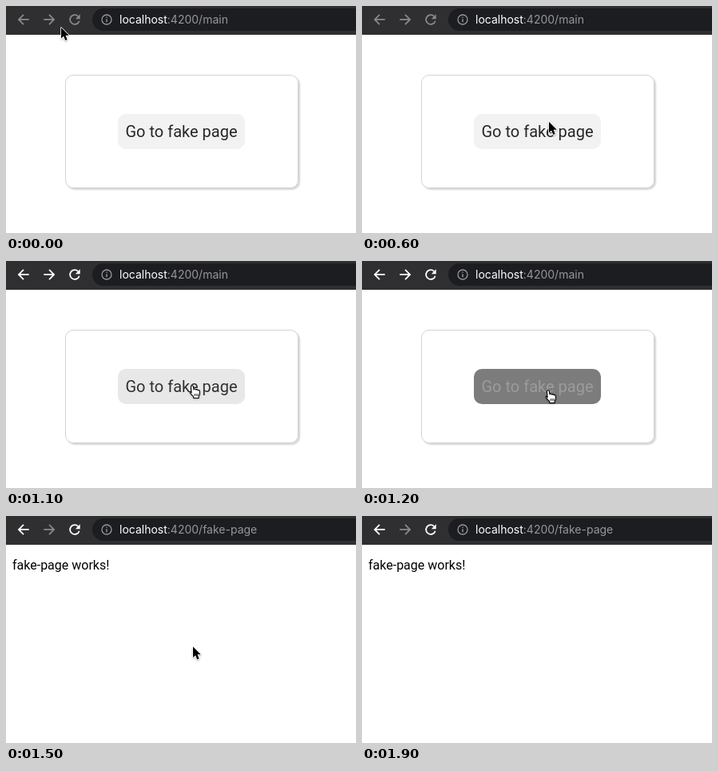
An HTML page for the animation above (2700 ms loop, 438 by 284 pixels).

```html
<!DOCTYPE html>
<html lang="en">
<head>
<meta charset="utf-8">
<title>Navigation demo</title>
<style>
  html, body { margin: 0; width: 100%; height: 100%; overflow: hidden; background: #fff; }
  #stage { position: relative; width: 438px; height: 284px; overflow: hidden; background: #fff; font-family: Roboto, sans-serif; }
  #bar { position: absolute; left: 0; top: 0; width: 438px; height: 36px; background: #2f2f31; }
  #bar svg { position: absolute; left: 0; top: 0; }
  #pill { position: absolute; left: 108px; top: 3px; width: 350px; height: 28px; border-radius: 14px; background: #1c1d21; }
  #url { position: absolute; left: 142px; top: 7px; font: 14px/20px Inter, sans-serif; color: #96979b; white-space: pre; }
  #url b { font-weight: 400; color: #fff; }
  #card { position: absolute; left: 74px; top: 86px; width: 292px; height: 142px; box-sizing: border-box;
    border: 1px solid #d3d3d3; border-radius: 10px; box-shadow: 2px 2px 2px rgba(0, 0, 0, .17); }
  #button { position: absolute; left: 140px; top: 135px; width: 159px; height: 44px; box-sizing: border-box;
    padding: 10px 0 0 9.5px; border-radius: 10px; font-size: 20px; line-height: 24px; white-space: nowrap; }
  #fake { position: absolute; left: 8px; top: 52px; margin: 0; font-size: 16px; line-height: 19px; color: #000; }
  #pointers { position: absolute; left: 0; top: 0; }
</style>
</head>
<body>
<div id="stage">
  <div id="bar">
    <div id="pill"></div>
    <svg width="438" height="36" fill="none">
      <g id="back" transform="translate(11.9 6.9) scale(.84)" stroke-width="2.1">
        <path d="M20 12H5.5M12 4.8 4.8 12l7.2 7.2"/>
      </g>
      <g id="forward" transform="translate(64.1 6.9) scale(-.84 .84)" stroke-width="2.1">
        <path d="M20 12H5.5M12 4.8 4.8 12l7.2 7.2"/>
      </g>
      <g id="reload" transform="translate(75.9 6.9) scale(.84)" stroke-width="2.1">
        <path d="M16.95 7.05A7 7 0 1 0 18.75 14"/>
        <path d="M20 4v7h-7z" fill="currentColor" stroke="none"/>
      </g>
      <g stroke="#96979b" stroke-width="1.3">
        <circle cx="126" cy="17" r="6"/>
        <path d="M126 16.2v4M126 13.4v1.4" stroke-width="1.4"/>
      </g>
    </svg>
    <div id="url"><b>localhost</b>:4200/<span id="path">main</span></div>
  </div>
  <div id="main">
    <div id="card"></div>
    <div id="button">Go to fake page</div>
  </div>
  <p id="fake">fake-page works!</p>
  <svg id="pointers" width="438" height="284" stroke-linejoin="round">
    <g id="arrow" style="filter: drop-shadow(0 1px 1px rgba(0,0,0,.3))">
      <path d="M0 0V13.6L3.1 10.7 5.3 15.9 7.7 14.9 5.5 9.8H9.8Z" fill="#000" stroke="#fff" stroke-width="1.6" paint-order="stroke"/>
    </g>
    <g id="hand" style="filter: drop-shadow(0 1px 1px rgba(0,0,0,.25))">
      <path d="M3.2 9.6V2Q3.2.6 4.5.6T5.8 2V6Q8-.2 0 0" fill="none"/>
      <path d="M3.1 9.9 2.5 2.2Q2.5.7 3.8.7T5.3 2L6 6Q6.3 5 7.3 5T8.7 6.3Q9 5.5 10 5.6T11.2 7Q11.6 6.4 12.4 6.6T13.4 8V11Q13.3 13 12.1 14.2V16.5H5.8V14.9L2.2 11.2Q.5 9.3 1.2 8.6T3.1 9.9Z" fill="#fff" stroke="#000" stroke-width="1.1"/>
      <path d="M7 11v3M9 11v3M11 11v3" stroke="#000" stroke-width=".8"/>
    </g>
  </svg>
</div>
<script>
const LOOP = 2700, FOCUS = 900, OPENED = 1500;
const $ = id => document.getElementById(id);

// start time, pointer shape, x, y
const moves = [
  [0, "arrow", 69, 27],
  [100, "arrow", 101, 17.5],
  [200, "arrow", 203, 41],
  [300, "arrow", 246, 75],
  [400, "arrow", 245, 108],
  [500, "arrow", 238, 134],
  [600, "arrow", 234, 145],
  [700, "arrow", 234, 151],
  [1100, "hand", 229, 155],
  [1200, "hand", 229, 161],
  [1300, "hand", 229, 164],
  [1500, "arrow", 234, 163.5],
  [1800, "arrow", 112.5, 147],
  [1900, "", 0, 0]
];

// start time, button fill, label colour
const shades = [
  [0, "#f2f2f2", "#262626"],
  [1100, "#e8e8e8", "#303030"],
  [1200, "#7c7c7c", "#9c9c9c"],
  [1300, "#353535", "#e6e6e6"]
];

const at = (steps, t) => steps.findLast(s => s[0] <= t);
const show = (id, on) => $(id).style.display = on ? "" : "none";

function tint(id, on) {
  $(id).style.color = $(id).style.stroke = on ? "#fff" : "#88898b";
}

function draw(t) {
  const opened = t >= OPENED, focused = t >= FOCUS;
  tint("back", focused);
  tint("forward", focused && !opened);
  tint("reload", focused);
  $("path").textContent = opened ? "fake-page" : "main";
  show("main", !opened);
  show("fake", opened);

  const [, fill, label] = at(shades, t);
  $("button").style.background = fill;
  $("button").style.color = label;

  const [, shape, x, y] = at(moves, t);
  for (const id of ["arrow", "hand"]) {
    show(id, id === shape);
    $(id).setAttribute("transform", `translate(${x} ${y})`);
  }
}

const start = performance.now();
function tick() {
  draw((performance.now() - start) % LOOP);
  requestAnimationFrame(tick);
}
tick();
</script>
</body>
</html>
```
